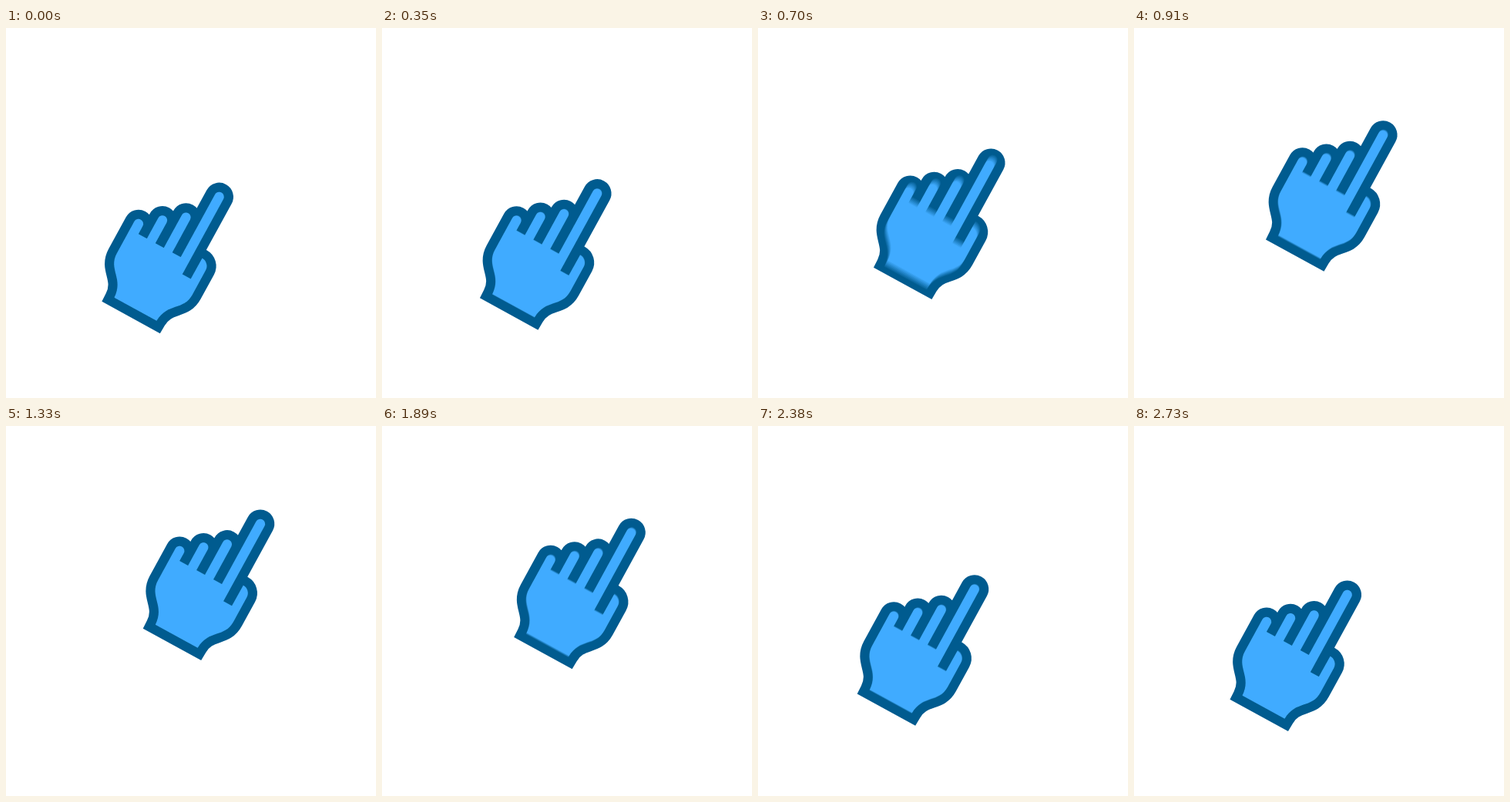
An HTML page with a canvas that plays this animation: 480x480 px, repeating every 2.8 s.

```html
<!DOCTYPE html>
<html lang="en">
<head>
<meta charset="utf-8">
<title>Pointing hand</title>
<style>
  html, body { margin: 0; height: 100%; overflow: hidden; background: #fff; }
  canvas { display: block; }
</style>
</head>
<body>
<canvas id="stage" width="480" height="480"></canvas>
<script>
const ctx = document.getElementById('stage').getContext('2d');
const LOOP = 2800, STEP = 70, SHUTTER = 30, COPIES = 8;
const START = { x: 124.7, y: 354.8 }, TRAVEL = { x: 53.4, y: -92.2 };

// Hand interior in local units, y up, with the cuff corner near the origin.
function handPath() {
  const path = new Path2D(), r = 6.2;
  const tips = [111, 130, 148, 192];
  const notches = [99.5, 99.5, 99.5, 81];
  path.moveTo(11.5, 12);
  path.bezierCurveTo(10.5, 40, -13.2, 40, -13.2, 64);
  tips.forEach((top, i) => {
    const x = -7 + 25 * i;
    path.arc(x, top, r, Math.PI, 0, true);
    path.lineTo(x + r, notches[i]);
    path.lineTo(x + 25 - r, notches[i]);
  });
  path.arc(87, 100, 11.4, Math.PI / 2, 0, true); // thumb
  path.lineTo(98.4, 64);
  path.bezierCurveTo(98.4, 40, 75, 40, 74, 12);
  path.closePath();
  return path;
}
const hand = handPath();

// Cubic Bezier easing (0.79, 0, 0.222, 1), solved by bisection.
function ease(x) {
  let low = 0, high = 1, u = 0.5;
  for (let i = 0; i < 24; i++) {
    u = (low + high) / 2;
    const v = 1 - u;
    if (3 * u * v * (0.79 * v + 0.222 * u) + u ** 3 < x) low = u;
    else high = u;
  }
  return u * u * (3 - 2 * u);
}

function progress(t) {
  const x = Math.min(t, LOOP + 5 - t) / (LOOP / 2);
  return ease(Math.max(0, Math.min(1, x)));
}

function place(p) {
  ctx.setTransform(1, 0, 0, 1, START.x + TRAVEL.x * p, START.y + TRAVEL.y * p);
  ctx.rotate(28.7 * Math.PI / 180);
  ctx.scale(1, -1);
}

function draw(t) {
  ctx.setTransform(1, 0, 0, 1, 0, 0);
  ctx.globalCompositeOperation = 'source-over';
  ctx.fillStyle = '#fff';
  ctx.fillRect(0, 0, 480, 480);

  place(progress(t));
  ctx.fillStyle = ctx.strokeStyle = '#005b8f';
  ctx.lineWidth = 24.4;
  ctx.stroke(hand);
  ctx.fill(hand);

  // Motion blur: the copies add up to the light fill colour.
  ctx.globalCompositeOperation = 'lighter';
  ctx.fillStyle = 'rgb(8, 10, 14)';
  for (let i = 0; i < COPIES; i++) {
    place(progress(t + SHUTTER * ((i + 0.5) / COPIES - 0.5)));
    ctx.fill(hand);
  }
}

function frame() {
  const t = performance.now() % LOOP;
  draw(Math.floor(t / STEP) * STEP);
  requestAnimationFrame(frame);
}
frame();
</script>
</body>
</html>
```
